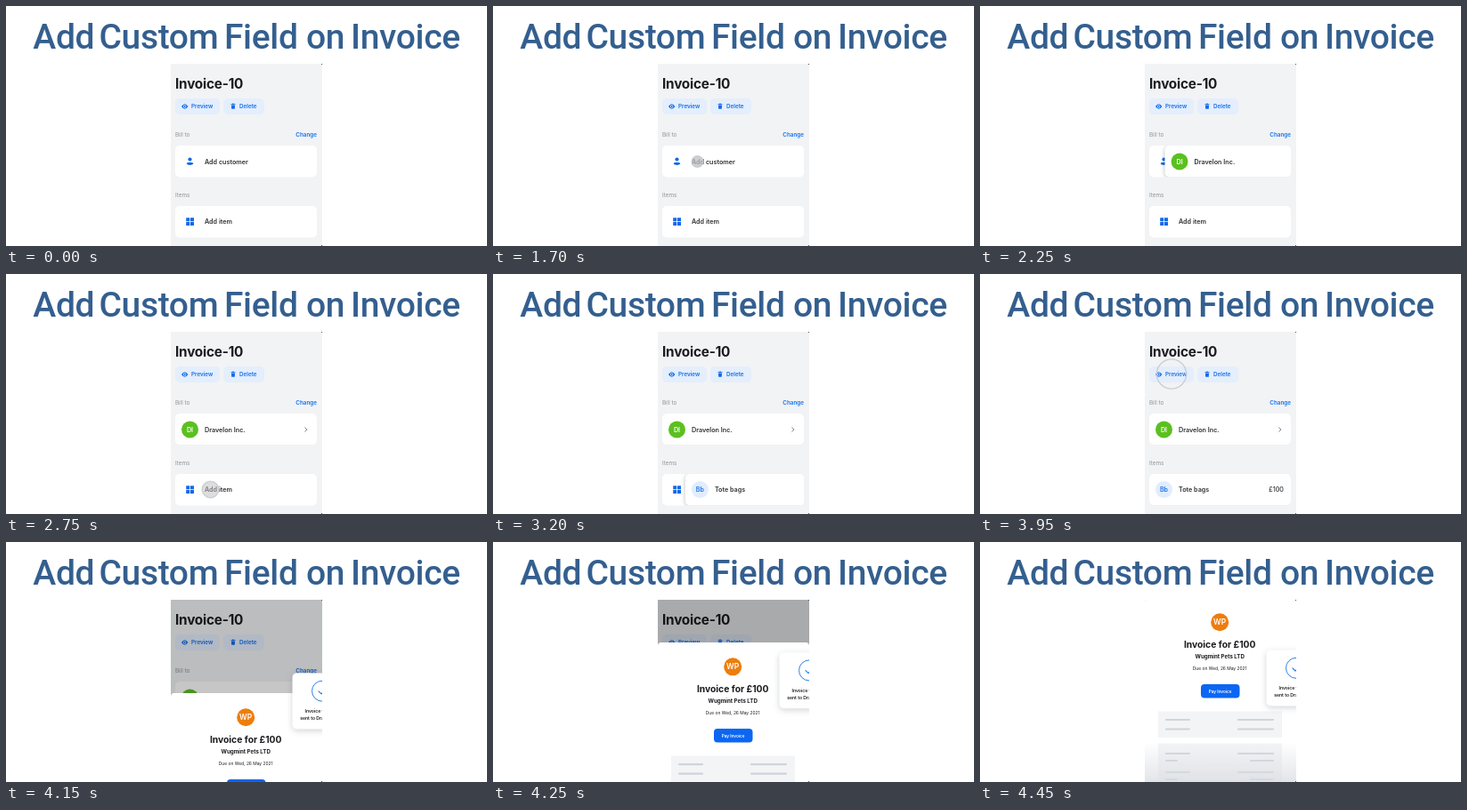
Write an HTML page that moves like this. It is 540 px wide and 270 px high and loops after 6.9 s.

```html
<!DOCTYPE html>
<html lang="en">
<head>
<meta charset="utf-8">
<title>Add Custom Field on Invoice</title>
<style>
  html, body { margin: 0; width: 100%; height: 100%; overflow: hidden; background: #fff; }
  svg { display: block; width: 100%; height: 100%; }
  text { font-family: Inter, "Open Sans", sans-serif; font-weight: 600; fill: #1b1c1f; }
  .headline { font: 500 39px Roboto, sans-serif; letter-spacing: -.35px; fill: #345f8f; }
  .title { font-size: 15.3px; font-weight: 700; letter-spacing: -.2px; }
  .bold { font-weight: 700; }
  .row { font-size: 7.2px; fill: #303236; }
  .link { font-size: 6.3px; fill: #1270ee; }
  .label { font-size: 6.3px; font-weight: 400; fill: #8f9297; }
  .mid { text-anchor: middle; }
  .end { text-anchor: end; }
  .light { fill: #fff; }
  .blue { fill: #1269e8; }
  .pill { fill: #e4eefc; }
  .card { fill: #fff; }
  .raised { filter: drop-shadow(0 1px 2.5px rgba(30, 40, 60, .32)); }
  .floating { filter: drop-shadow(0 2px 3.5px rgba(30, 40, 60, .2)); }
  .line { fill: none; stroke-linecap: round; stroke-linejoin: round; }
</style>
</head>
<body>
<svg viewBox="0 0 540 270">
  <defs>
    <clipPath id="screenClip"><rect x="185" y="65" width="170" height="205"/></clipPath>
    <clipPath id="customerClip"><rect x="190" y="157" width="159" height="35.500" rx="5"/></clipPath>
    <clipPath id="itemClip"><rect x="190" y="225" width="159" height="35.500" rx="5"/></clipPath>
    <linearGradient id="fade" x1="0" y1="0" x2="0" y2="1">
      <stop offset="0" stop-color="#d9dce1" stop-opacity="0"/>
      <stop offset="1" stop-color="#d9dce1" stop-opacity=".75"/>
    </linearGradient>
  </defs>

  <text class="headline" y="48"><tspan x="30.300">Add</tspan><tspan x="104.500">Custom</tspan><tspan x="245">Field</tspan><tspan x="337">on</tspan><tspan x="387">Invoice</tspan></text>

  <g clip-path="url(#screenClip)">
    <rect x="185" y="65" width="170" height="205" fill="#f2f3f5"/>
    <text class="title" x="190" y="93.300">Invoice-10</text>

    <rect class="pill" x="190" y="104" width="50" height="18" rx="5"/>
    <path class="blue" d="M197 113Q200.700 107.500 204.400 113Q200.700 118.500 197 113Z"/>
    <circle cx="200.700" cy="113" r="1.700" fill="#e4eefc"/>
    <circle class="blue" cx="200.700" cy="113" r=".9"/>
    <text class="link" x="208" y="115.200">Preview</text>

    <rect class="pill" x="244" y="104" width="46" height="18" rx="5"/>
    <path class="blue" d="M252.500 110.200h1.500l.4-.7h1.200l.4.7h1.500v.9h-5zM252.900 111.600h4.200l-.3 4.200h-3.600z"/>
    <text class="link" x="262" y="115.200">Delete</text>

    <text class="label" x="190" y="147.200">Bill to</text>
    <text class="link end" x="349" y="147.200">Change</text>
    <rect class="card" x="190" y="157" width="159" height="35.500" rx="5"/>
    <circle class="blue" cx="206.500" cy="172.500" r="2.100"/>
    <path class="blue" d="M202.700 177.600Q202.700 175.700 206.500 175.700T210.300 177.600Q209.500 179 206.500 179T202.700 177.600Z"/>
    <text class="row" x="223" y="177.500">Add customer</text>

    <text class="label" x="190" y="214.700">Items</text>
    <rect class="card" x="190" y="225" width="159" height="35.500" rx="5"/>
    <path class="blue" d="M202.200 238.300h4v4h-4zM207 238.300h4v4h-4zM202.200 243h4v4h-4zM207 243h4v4h-4z"/>
    <text class="row" x="223" y="245.100">Add item</text>

    <g clip-path="url(#customerClip)"><g id="customer">
      <rect class="card raised" x="190" y="157" width="159" height="35.500" rx="5"/>
      <circle cx="206.500" cy="175" r="9.500" fill="#5bc01f"/>
      <text class="row light mid" x="206.500" y="177.600">DI</text>
      <text class="row" x="223" y="177.500">Dravelon Inc.</text>
      <path class="line" d="M335.800 172.800l2.200 2.200l-2.200 2.200" stroke="#777b82" stroke-width=".9"/>
    </g></g>

    <g clip-path="url(#itemClip)"><g id="item">
      <rect class="card raised" x="190" y="225" width="159" height="35.500" rx="5"/>
      <circle cx="206.500" cy="242.500" r="9.500" fill="#e1edfd"/>
      <text class="row mid" x="206.500" y="245.100" style="fill:#1f74e8">Bb</text>
      <text class="row" x="223" y="245.100">Tote bags</text>
      <text class="row end" x="341" y="245.100" style="font-weight:500">£100</text>
    </g></g>

    <circle id="tap" stroke="#c6c8cb" stroke-width="1.400" fill="#bfc0c2"/>
    <rect id="dim" x="185" y="65" width="170" height="205"/>

    <g id="sheet">
      <rect x="185" y="63" width="170" height="230" rx="4" fill="#fff"/>
      <circle cx="269.200" cy="90.300" r="10" fill="#ee7d0c"/>
      <text class="light mid" x="269.200" y="93.400" font-size="8.500">WP</text>
      <text class="bold mid" x="269.200" y="119" font-size="10.300">Invoice for £100</text>
      <text class="bold mid" x="269.200" y="130.500" font-size="6.200">Wugmint Pets LTD</text>
      <text class="mid" x="269.200" y="144.400" font-size="4.900" style="font-weight:400">Due on Wed, 26 May 2021</text>
      <rect x="248" y="160" width="43.500" height="15.500" rx="4" fill="#0b66f3"/>
      <text class="light mid" x="269.700" y="169.500" font-size="4.700">Pay Invoice</text>
      <rect x="200" y="190.500" width="139" height="29.500" fill="#f3f4f6"/>
      <rect x="200" y="226.500" width="139" height="60" fill="#f3f4f6"/>
      <path class="line" stroke="#d0d4da" stroke-width="2.200" d="M209 200h26M290 200h39M209 210.500h26M290 210.500h39M209 238h26M290 238h39M209 246h12M304 246h25M209 259h26M290 259h39M209 267h12M304 267h25"/>
      <rect x="185" y="225" width="170" height="45" fill="url(#fade)"/>
    </g>

    <g id="toast">
      <rect class="card floating" x="321.500" y="121.500" width="66" height="63" rx="5"/>
      <circle class="line" cx="355" cy="141.800" r="11.500" stroke="#2b7fe4"/>
      <path class="line" d="M351 142l3 3l6-6" stroke="#2b7fe4" stroke-width="1.200"/>
      <text x="335.500" y="166" font-size="5.100">Invoice was</text>
      <text x="330.200" y="174" font-size="5.100">sent to Dravelon</text>
    </g>
  </g>
  <path d="M354 65h1v1h-1zM354 269h1v1h-1z" fill="#555"/>
</svg>

<script>
const LOOP = 6900, STEP = 50;
const TAPS = [
  { start: 1700, x: 229.5, y: 175 },
  { start: 2700, x: 229.5, y: 242.5 },
  { start: 3650, x: 215, y: 112.5 },
];
const TAP_TIME = 400;
const [customer, item, tap, dim, sheet, toast] =
  ['customer', 'item', 'tap', 'dim', 'sheet', 'toast'].map(id => document.getElementById(id));

const progress = (t, start, length) => Math.min(1, Math.max(0, (t - start) / length));
const set = (el, attrs) => {
  for (const name in attrs) el.setAttribute(name, attrs[name]);
};
const move = (el, x, y) => set(el, { transform: `translate(${x} ${y})` });

// Cards glide in from the right edge shortly after their tap.
const cardOffset = (t, start) => 165 * (1 - progress(t, start + 150, 760)) ** 3;

function drawTap(t) {
  const active = TAPS.find(({ start }) => t >= start && t < start + TAP_TIME);
  set(tap, { visibility: active ? 'visible' : 'hidden' });
  if (!active) return;
  const p = progress(t, active.start, TAP_TIME);
  set(tap, {
    cx: active.x,
    cy: active.y,
    r: 6.3 + 10.7 * (1 - (1 - p) ** 2.5),
    'fill-opacity': 0.75 * (1 - p) ** 2.5,
    'stroke-opacity': 0.85 * Math.min(1, (1 - p) * 4),
  });
}

function draw(t) {
  move(customer, cardOffset(t, 1700), 0);
  move(item, cardOffset(t, 2700), 0);
  drawTap(t);

  const remaining = 1 - Math.sin(progress(t, 4000, 450) * Math.PI / 2);
  move(sheet, 0, 214 * remaining);
  move(toast, 0, 207 * remaining ** 3);
  set(toast, { visibility: t > 4000 ? 'visible' : 'hidden' });
  set(dim, { opacity: 0.3 * progress(t, 4000, 200) });
}

const origin = performance.now();
function tick() {
  const t = (performance.now() - origin) % LOOP;
  draw(Math.floor(t / STEP) * STEP);
  requestAnimationFrame(tick);
}
tick();
</script>
</body>
</html>
```
